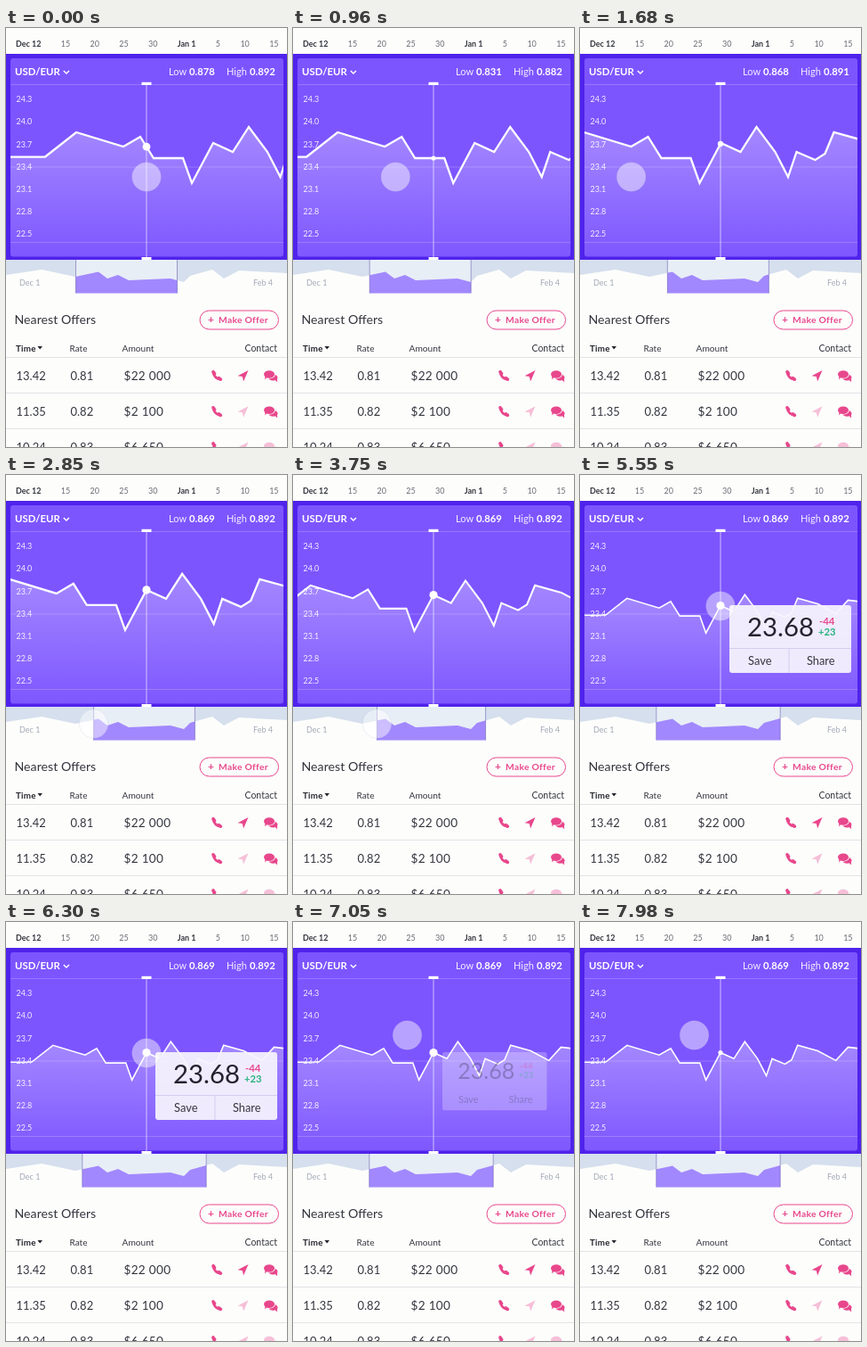
Animation of 316 by 470 pixels, one loop 8000 ms. Source, as an HTML page with a canvas:

```html
<!DOCTYPE html>
<html lang="en">
<head>
<meta charset="utf-8">
<title>Currency chart</title>
<style>
html, body { margin: 0; width: 100%; height: 100%; overflow: hidden; background: #fdfefc; }
canvas { display: block; width: 316px; height: 470px; }
</style>
</head>
<body>
<canvas id="stage"></canvas>
<script>
const W = 316, H = 470, LOOP = 8000, MID = 158;
const BG = '#fdfefc', INK = '#35353f', PINK = '#e8478c', PALE = '#f6bfd8';
const canvas = document.getElementById('stage');
const c = canvas.getContext('2d');
const dpr = window.devicePixelRatio || 1;
canvas.width = W * dpr;
canvas.height = H * dpr;

// Turning points of the rate curve, before scrolling and zooming.
const rates = [
  [-60, 145], [44, 144.5], [79, 117], [132, 133], [151, 122], [166, 146],
  [199, 146], [209, 174], [233, 129], [255, 139], [273, 111], [294, 139],
  [308.5, 167], [318, 139], [339, 148], [350, 141], [360, 117], [393, 126],
  [423, 142], [443, 120], [500, 127]
];
const ridge = [
  [0, 277], [40, 271], [78, 279], [104, 273.5], [114, 281], [126, 277],
  [138, 283], [185, 281], [200, 285], [207, 278], [232, 271], [245, 281],
  [262, 272], [316, 275]
];

const clamp = v => Math.max(0, Math.min(1, v));
const mix = (a, b, p) => a + (b - a) * p;
const smooth = v => { v = clamp(v); return v * v * (3 - 2 * v); };
const ramp = (t, from, span) => smooth((t - from) / span);
const pulse = (t, from, to, span) => ramp(t, from, span) - ramp(t, to, span);
const white = a => `rgba(255,255,255,${a})`;

function text(str, x, y, size, color = INK, bold = false, spacing = 0) {
  c.font = `${bold ? 'bold ' : ''}${size}px Lato, "Open Sans", sans-serif`;
  c.letterSpacing = spacing + 'px';
  c.fillStyle = color;
  c.fillText(str, x, y + size * 0.36);
  return c.measureText(str).width;
}

function box(x, y, w, h, color) {
  c.fillStyle = color;
  c.fillRect(x, y, w, h);
}

function rounded(x, y, w, h, r) {
  c.beginPath();
  c.roundRect(x, y, w, h, r);
}

function trace(points) {
  c.beginPath();
  points.forEach(([x, y]) => c.lineTo(x, y));
}

function fill(color) {
  c.fillStyle = color;
  c.fill();
}

function stroke(color, width) {
  c.strokeStyle = color;
  c.lineWidth = width;
  c.stroke();
}

function disc(x, y, rx, color, ry = rx) {
  c.beginPath();
  c.ellipse(x, y, rx, ry, 0, 0, Math.PI * 2);
  fill(color);
}

function drawDates() {
  let x = 11;
  for (const label of ['Dec 12', '15', '20', '25', '30', 'Jan 1', '5', '10', '15']) {
    const month = label.length > 2;
    x += text(label, x, 18, 9, month ? INK : '#6b6b74', month) + 22.3;
  }
}

function drawChart(s) {
  box(0, 29, W, 231, '#5023ec');
  rounded(5, 34, 307, 222.5, 3);
  fill('#7d55ff');

  c.save();
  c.clip();
  trace([...s.line, [W + 300, H], [-300, H]]);
  const shade = c.createLinearGradient(0, s.top, 0, 257);
  shade.addColorStop(0, white(0.3));
  shade.addColorStop(1, white(0.01));
  fill(shade);
  for (const y of [63, 155.5, 240]) box(0, y, W, 1, white(0.2));
  for (let i = 0; i < 7; i++)
    text((24.3 - i * 0.3).toFixed(1), 11.5, 80 + i * 25.2, 9, white(0.9));
  trace(s.line);
  stroke('#fff', 2.3 * s.zoom);
  c.restore();

  text('USD/EUR', 10, 49, 11.4, '#fff', true);
  trace([[64.8, 48], [67.9, 51], [71, 48]]);
  stroke('#fff', 1.4);
  text('Low', 183, 49, 11, white(0.9));
  text(s.low.toFixed(3), 206, 49, 11.3, '#fff', true);
  text('High', 248, 49, 11, white(0.9));
  text(s.high.toFixed(3), 274, 49, 11.3, '#fff', true);

  box(MID - 0.5, 62, 1, 197, white(0.62));
  for (const y of [60.8, 257]) box(MID - 5.5, y, 11, 3.2, '#fff');
  disc(MID, s.dotY, s.dotR, '#fff');
}

function drawOverview(s) {
  const hill = [...ridge, [W, 298], [0, 298]];
  const layer = (sky, ground) => {
    box(0, 260, W, 38, sky);
    trace(hill);
    fill(ground);
  };
  layer('#d5dfed', BG);
  c.save();
  c.beginPath();
  c.rect(s.left, 260, s.right - s.left, 37.5);
  c.clip();
  layer('#e8eef6', '#a288fe');
  c.restore();
  for (const x of [s.left, s.right]) box(x - 0.5, 260, 1, 37.5, 'rgba(112,100,180,.6)');
  text('Dec 1', 15, 286, 9, '#a3a9b6');
  text('Feb 4', 278, 286, 9, '#a3a9b6');
}

function phone(x, y) {
  c.lineCap = 'round';
  c.beginPath();
  c.moveTo(x - 3.9, y - 3.2);
  c.quadraticCurveTo(x - 2.5, y + 2.6, x + 3.6, y + 4.2);
  stroke(PINK, 2.8);
  trace([[x - 4, y - 4.4], [x - 2.4, y - 2.2]]);
  stroke(PINK, 3.6);
  trace([[x + 2.4, y + 2.6], [x + 4.4, y + 4.2]]);
  stroke(PINK, 3.6);
  c.lineCap = 'butt';
}

function plane(x, y, color) {
  trace([[x + 6, y - 6], [x - 6, y + 0.2], [x - 0.7, y + 1.1], [x + 0.6, y + 6.6]]);
  fill(color);
}

function bubble(x, y, rx, ry, side, color) {
  disc(x, y, rx, color, ry);
  trace([[x + side * 1.5, y + 2], [x + side * 4.8, y + ry + 1.7], [x + side * 4.6, y]]);
  fill(color);
}

function chat(x, y, color) {
  bubble(x + 2.8, y + 2, 5.2, 3.6, 1, color);
  disc(x - 1.5, y - 1.5, 6.8, BG, 5);
  bubble(x - 1.5, y - 1.5, 6, 4.2, -1, color);
}

function drawOffers() {
  text('Nearest Offers', 9.5, 326.5, 14.2);
  rounded(218, 317, 88.5, 21, 10.5);
  stroke(PINK, 1);
  text('+', 227, 326.8, 12, PINK, true);
  text('Make Offer', 239, 327.5, 10.3, PINK, true, 0.3);

  text('Time', 11, 359, 9.8, '#24242c', true, 0.2);
  trace([[35.5, 357], [41, 357], [38.2, 360.4]]);
  fill('#24242c');
  text('Rate', 71.5, 359, 10);
  text('Amount', 130.5, 359, 10.2);
  text('Contact', 268.5, 359, 10.5);

  const rows = [['13.42', '0.81', '$22 000'], ['11.35', '0.82', '$2 100'], ['10.24', '0.83', '$6 650']];
  rows.forEach(([time, rate, amount], i) => {
    const y = 390 + i * 40.2;
    box(0, Math.round(y) - 21, W, 1, '#e2e3e6');
    text(time, 11.5, y, 13);
    text(rate, 72.5, y, 13);
    text(amount, 132.5, y, 13.6, INK, false, 0.3);
    phone(237, y);
    plane(266.5, y, i > 0 ? PALE : PINK);
    chat(297.5, y, i > 1 ? PALE : PINK);
  });
}

function drawPopup(p) {
  if (p <= 0) return;
  const x = 168, y = 146, size = mix(0.8, 1, p);
  c.save();
  c.globalAlpha = p;
  c.translate(x, y);
  c.scale(size, size);
  rounded(0, 0, 137, 76, 3);
  fill('rgba(247,245,253,.93)');
  box(0, 48, 137, 1, 'rgba(150,135,205,.3)');
  box(66.5, 49, 1, 27, 'rgba(150,135,205,.3)');
  text('23.68', 20, 24.5, 29.3, '#25222f');
  text('-44', 101, 17.5, 11.4, PINK, true);
  text('+23', 100, 30, 11.2, '#27b37d', true);
  text('Save', 21, 62, 12.9);
  text('Share', 87, 62, 12.8);
  c.restore();
}

function drawFinger([x, y]) {
  disc(x, y, 16.3, white(0.45));
  stroke('rgba(175,180,205,.3)', 0.7);
}

function lineAt(points, x) {
  const i = points.findIndex(p => p[0] >= x);
  const [x0, y0] = points[i - 1], [x1, y1] = points[i];
  return mix(y0, y1, (x - x0) / (x1 - x0));
}

function stateAt(t) {
  const drag = clamp((t - 30) / 1710);
  const scroll = smooth(drag ** 1.42);
  const zoom = 1 + 0.09 * ramp(t, 2820, 330) - 0.407 * ramp(t, 3150, 1250);
  const grow = (1 - zoom) * 40;
  const left = 78.5 + 20 * scroll - grow;
  const right = 192.5 + 20 * scroll + grow;
  const mapY = y => mix(184.2, y, zoom);
  const line = rates.map(([x, y]) => [mix(MID, x - 75 * scroll, zoom), mapY(y)]);
  const dotY = lineAt(line, MID);

  // Drag the chart, pull the left handle, tap the dot, then move off.
  let finger = [MID - 101 * smooth(drag ** 1.32), 167];
  const moveTo = (x, y, from, span) => {
    const p = ramp(t, from, span);
    finger = [mix(finger[0], x, p), mix(finger[1], y, p)];
  };
  moveTo(left, 279, 2130, 540);
  moveTo(MID, dotY + 0.5, 4680, 540);
  moveTo(128.5, 127, 6320, 430);

  const swing = 4 * scroll * (1 - scroll);
  return {
    zoom, left, right, line, dotY, finger,
    top: mapY(111),
    dotR: 4.6 - 2 * (pulse(t, -50, 1600, 250) + ramp(t, 7530, 270)),
    low: 0.878 - 0.009 * scroll - 0.046 * swing,
    high: 0.8916 - 0.01 * swing,
    popup: pulse(t, 5270, 6870, 280)
  };
}

function draw(t) {
  const s = stateAt(t);
  c.setTransform(dpr, 0, 0, dpr, 0, 0);
  box(0, 0, W, H, BG);
  drawDates();
  drawChart(s);
  drawOverview(s);
  drawOffers();
  drawPopup(s.popup);
  drawFinger(s.finger);
}

const start = performance.now();
function tick() {
  draw((performance.now() - start) % LOOP);
  requestAnimationFrame(tick);
}
tick();
</script>
</body>
</html>
```
